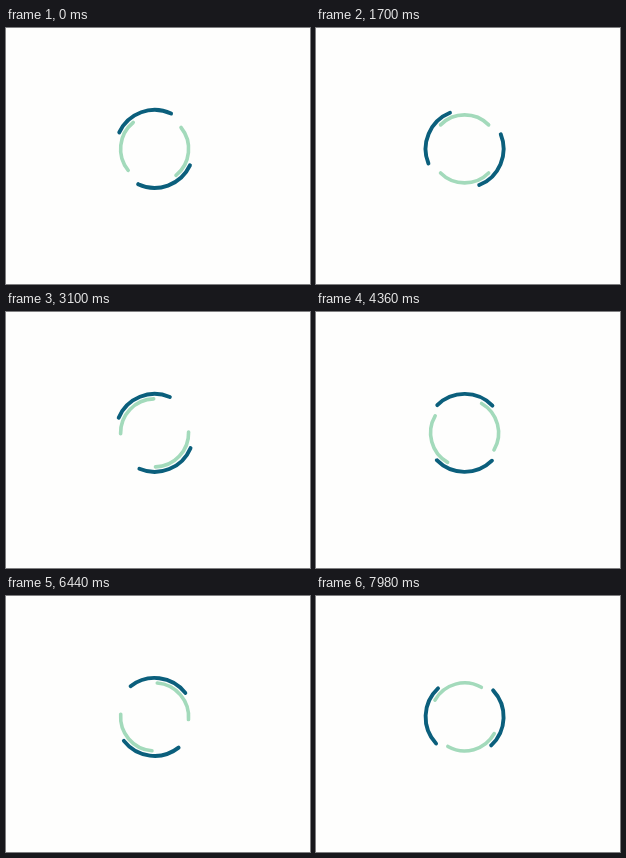
These frames come from a looping animation (304x256 px, 8000 ms). An HTML page:

```html
<!DOCTYPE html>
<html lang="en">
<head>
<meta charset="utf-8">
<title>Double ring loader</title>
<style>
  html, body { margin: 0; width: 100%; height: 100%; overflow: hidden; background: #fefefd; }
  svg { display: block; width: 304px; height: 256px; }
  circle { fill: none; stroke-linecap: round; }
</style>
</head>
<body>
<svg viewBox="0 0 304 256">
  <!-- pathLength 4: two quarter arcs, the first centred on angle 45 -->
  <g transform="translate(148.6 120.9)">
    <circle id="outer" r="39" stroke="#0b5f7c" stroke-width="3.9" pathLength="4" stroke-dasharray="1 1"/>
    <circle id="inner" r="34" stroke="#a3dabb" stroke-width="3.6" pathLength="4" stroke-dasharray="1 1"/>
  </g>
</svg>
<script>
const LOOP = 8000;
const CADENCE = 140;        // three steps per beat, one of them held for 100 ms
const CADENCE_SHIFT = 4620; // from here the long hold ends the beat

// [step, outer angle, inner angle] of the arc centres, in degrees
const poses = [
  [0, 70, 6],
  [37, 383, -270],
  [67, 608, -496.5],
  [94, 810.5, -735],
  [117, 983, -944],
  [138, 1177, -1120.5],
  [171, 1442, -1365.5],
];

function stepAt(time) {
  const rest = time % CADENCE;
  const thirdStart = time < CADENCE_SHIFT ? 120 : 40;
  return 3 * Math.floor(time / CADENCE) + (rest >= 20) + (rest >= thirdStart);
}

function angleAt(step, ring) {
  const next = Math.max(1, poses.findIndex(pose => pose[0] >= step));
  const from = poses[next - 1], to = poses[next];
  const progress = (step - from[0]) / (to[0] - from[0]);
  return from[ring] + (to[ring] - from[ring]) * progress;
}

const rings = ["outer", "inner"].map(id => document.getElementById(id));

function draw() {
  const step = Math.min(171, stepAt(performance.now() % LOOP));
  rings.forEach((circle, i) =>
    circle.setAttribute("transform", `rotate(${angleAt(step, i + 1) - 45})`));
  requestAnimationFrame(draw);
}
draw();
</script>
</body>
</html>
```
